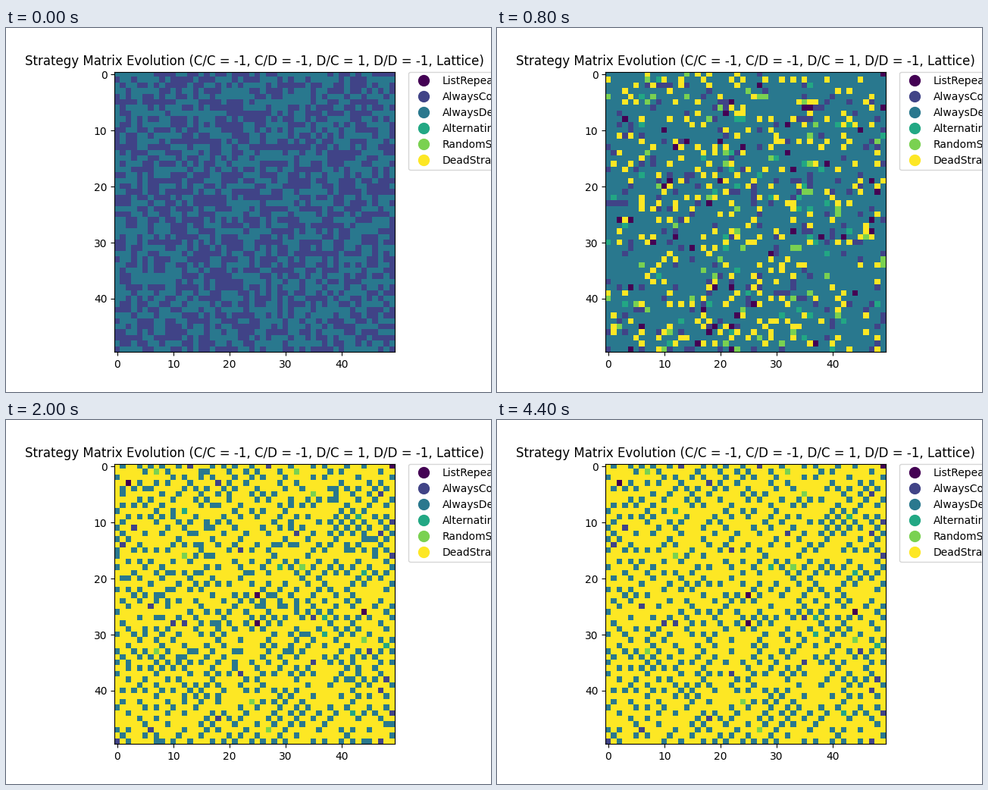
A matplotlib script that plays this animation: 640x480 px, repeating every 6200 ms.

```python
import random

import matplotlib.pyplot as plt
import numpy as np
from matplotlib.animation import FuncAnimation
from matplotlib.lines import Line2D

SIZE, STEPS = 50, 31
MEDIAN_DEATH, STEEPNESS, LAST_DEATH = 5.45, 5.5, 22
REPEAT, COOPERATE, DEFECT, ALTERNATE, RANDOM, DEAD = range(6)
LABELS = ["ListRepeatStrategy", "AlwaysCooperate", "AlwaysDefect",
          "AlternatingStrategy", "RandomStrategy", "DeadStrategy"]

rng = np.random.default_rng(7)
random.seed(7)


def neighbours(grid):
    """Sum over the four cells that share an edge with each cell."""
    p = np.pad(grid.astype(int), 1)
    return p[:-2, 1:-1] + p[2:, 1:-1] + p[1:-1, :-2] + p[1:-1, 2:]


def death_order():
    """Kill cells one by one; a cell with no living neighbour is safe."""
    alive = np.pad(np.ones((SIZE, SIZE), int), 1)

    def contacts(cell):
        y, x = cell
        return alive[y - 1, x] + alive[y + 1, x] + alive[y, x - 1] + alive[y, x + 1]

    def exposure(cell):
        y, x = cell
        return contacts(cell) - .4 * (alive[y - 1, x + 1] + alive[y + 1, x - 1])

    waiting = [(y, x) for y in range(1, SIZE + 1) for x in range(1, SIZE + 1)]
    order = []
    while waiting:
        rivals = random.sample(waiting, min(2, len(waiting)))
        cell = max(rivals, key=exposure)
        waiting.remove(cell)
        if contacts(cell):
            alive[cell] = 0
            order.append((cell[0] - 1, cell[1] - 1))
    return order


def schedule_deaths():
    """Spread the deaths over time along a log-logistic curve."""
    dies = np.full((SIZE, SIZE), STEPS)
    order = death_order()
    for i, cell in enumerate(order):
        share = (i + .5) / len(order)
        time = MEDIAN_DEATH * (share / (1 - share)) ** (1 / STEEPNESS)
        dies[cell] = np.clip(np.ceil(time), 2, LAST_DEATH)
    return dies


def first_switch(kind):
    """Most cooperators turn into defectors, some into rarer strategies."""
    switched = rng.choice([COOPERATE, DEFECT, REPEAT, ALTERNATE, RANDOM],
                          kind.shape, p=[.37, .45, .06, .06, .06])
    return np.where(kind == COOPERATE, switched, kind)


def switch(kind, step, active):
    """Active cells drift to defection, with ever fewer mutations."""
    mutants = rng.choice([COOPERATE, REPEAT, ALTERNATE, RANDOM],
                         kind.shape, p=[.4, .2, .2, .2])
    defects = kind == DEFECT
    chance = np.where(defects, .06 * np.exp((2 - step) / 4), .1 * step)
    flips = active & (rng.random(kind.shape) < chance)
    return np.where(flips, np.where(defects, mutants, DEFECT), kind)


def simulate():
    dies = schedule_deaths()
    kind = rng.choice([COOPERATE, DEFECT], (SIZE, SIZE))
    history = [kind]
    for step in range(1, STEPS):
        alive = step < dies
        if step == 1:
            kind = first_switch(kind)
        else:
            kind = switch(kind, step, alive & (neighbours(alive) > 0))
        history.append(np.where(alive, kind, DEAD))
    return history


history = simulate()

fig, ax = plt.subplots(figsize=(6.4, 4.8), dpi=100)
image = ax.imshow(history[0], cmap="viridis", vmin=0, vmax=DEAD,
                  interpolation="nearest")
ax.set_title("Strategy Matrix Evolution "
             "(C/C = -1, C/D = -1, D/C = 1, D/D = -1, Lattice)")
handles = [Line2D([], [], marker="o", linestyle="none", markersize=10,
                  color=plt.cm.viridis(i / DEAD), label=label)
           for i, label in enumerate(LABELS)]
ax.legend(handles=handles, bbox_to_anchor=(1.05, 1), loc="upper left",
          borderaxespad=0)


def draw(step):
    image.set_data(history[step])
    return [image]


anim = FuncAnimation(fig, draw, frames=STEPS, interval=200, repeat=True)
plt.show()
```
